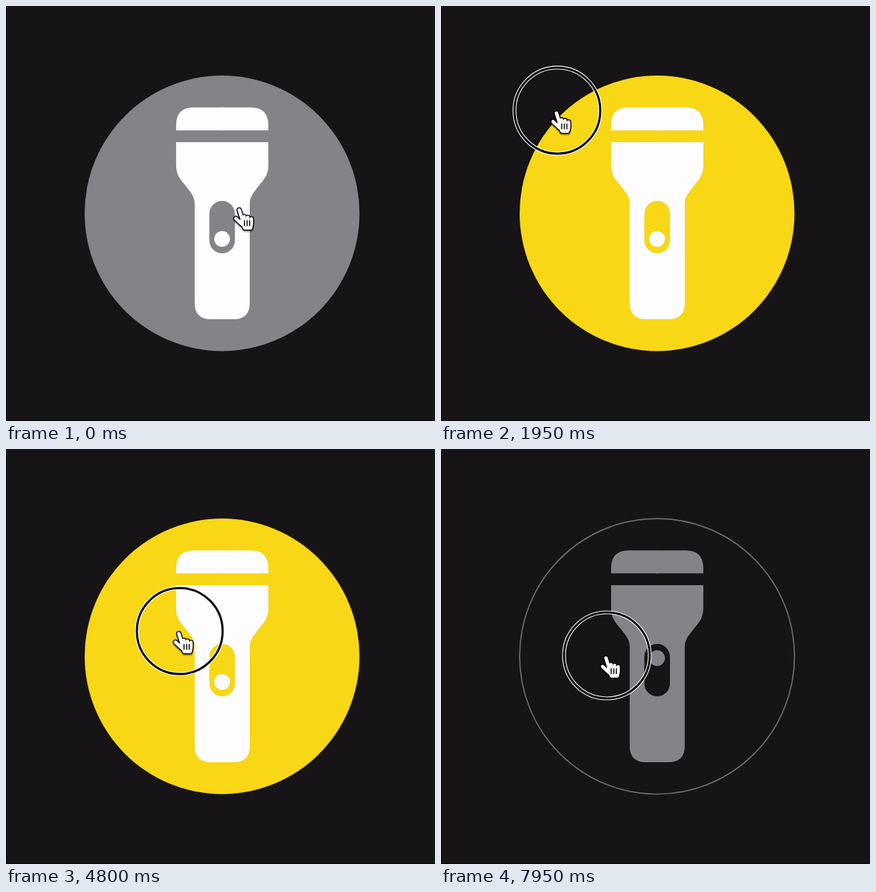
Recreate the animation shown at these times as an HTML page. Size 600 px wide and 579 px high, loop 8 s.

```html
<!DOCTYPE html>
<html lang="en">
<head>
<meta charset="utf-8">
<title>Flashlight button</title>
<style>
  html, body { margin: 0; width: 100%; height: 100%; overflow: hidden; background: #161417; }
  svg { display: block; width: 100vw; height: 100vh; }
</style>
</head>
<body>
<svg viewBox="0 0 600 579">
  <defs>
    <!-- left half of the torch; reaches past the axis so no seam shows -->
    <path id="half" d="M1 -148H-40Q-64.500 -148 -64.500 -123V-116H1ZM1 -99.500H-64.500V-68
      C-64.500 -54 -59 -48 -53 -41L-46 -32Q-38.500 -23 -38.500 -14V125Q-38.500 147.500 -16 147.500H1Z"/>
    <path id="hand" d="M-1.300 3.600L3 17M-6 15.500L3 24M5.700 13V24M10.700 14V24M2 19L6.500 28.700H14.500L15.700 23V16"/>
  </defs>
  <rect width="600" height="579" fill="#161417"/>
  <path d="M.5 0V579M0 578.500H600" stroke="#08070a"/>
  <circle id="disc" cx="302.200" cy="289.300" r="192.200" stroke-width="1.700" stroke-opacity=".8"/>
  <g id="torch" transform="translate(302.400 289.500)">
    <use href="#half"/>
    <use href="#half" transform="scale(-1 1)"/>
  </g>
  <rect id="slot" x="284.400" y="272" width="35.800" height="73" rx="17.900"/>
  <circle id="knob" cx="302.200" r="11"/>
  <g id="pointer" fill="none">
    <g id="ring">
      <circle r="60" stroke="#fff" stroke-width="5.200"/>
      <circle r="60" stroke="#050505" stroke-width="3"/>
    </g>
    <g stroke="#000" stroke-linecap="round" stroke-linejoin="round">
      <use href="#hand" y="2" stroke-width="8" opacity=".25"/>
      <use href="#hand" stroke-width="7.600"/>
      <use href="#hand" stroke="#fff" fill="#fff" stroke-width="4.800"/>
      <path d="M6 18.500V25.500M9.700 18.500V25.500M13.300 18.500V25.500" stroke-width="1.400"/>
    </g>
  </g>
</svg>
<script>
const LOOP = 8000, STEP = 50;
const GRAY = '#858288', YELLOW = '#f7d716', WHITE = '#fdfcff', DARK = '#161417';
const TOGGLE = 4850, SLIDE = 200;
const presses = [[400, 3580], [4700, TOGGLE], [6500, LOOP]];

const smooth = u => u * u * (3 - 2 * u);
const easeOut = u => Math.sin(u * Math.PI / 2);
const easeIn = u => u ** 3;

// The pointer rests between moves
const home = { x: 327.5, y: 281 };
const moves = [
  { from: 50, to: 700, x: 363, y: 348 },
  { from: 850, to: 1400, x: 45, y: 2 },
  { from: 1650, to: 2450, x: 257, y: 261, ease: easeOut },
  { from: 2900, to: 3450, x: 82, y: 19 },
  { from: 4020, to: 4650, x: 243, y: 254 },
  { from: 5720, to: 6100, x: 56, y: 272 },
  { from: 6220, to: 6550, x: 186, y: 274 },
  { from: 6880, to: 7350, x: 52, y: 278 },
  { from: 7400, to: 7950, x: 232, y: 288, ease: easeIn }
];

const clamp = u => Math.min(1, Math.max(0, u));

function pointerAt(t) {
  let { x, y } = home;
  for (const m of moves) {
    const k = (m.ease || smooth)(clamp((t - m.from) / (m.to - m.from)));
    x += (m.x - x) * k;
    y += (m.y - y) * k;
  }
  return { x, y };
}

function set(id, attrs) {
  const el = document.getElementById(id);
  for (const k in attrs) el.setAttribute(k, attrs[k]);
}

function draw(t) {
  const { x, y } = pointerAt(t);
  const down = presses.some(([a, b]) => t >= a && t < b);
  const inside = Math.max(Math.abs(x - 302), Math.abs(y - 289)) < 192;
  const on = t >= TOGGLE;
  const tint = on !== (down && inside) ? YELLOW : GRAY;
  const back = on ? DARK : tint, icon = on ? tint : WHITE;
  const slide = easeOut(clamp((t - TOGGLE) / SLIDE));

  set('disc', { fill: back, stroke: on ? tint : 'none' });
  set('torch', { fill: icon });
  set('slot', { fill: back });
  set('knob', { fill: icon, cy: 325 - 33.3 * slide });
  set('ring', { visibility: down ? 'visible' : 'hidden' });
  set('pointer', { transform: `translate(${x} ${y})` });
}

const start = performance.now();
function tick(now) {
  const t = Math.max(0, now - start) % LOOP;
  draw(Math.floor(t / STEP) * STEP);
  requestAnimationFrame(tick);
}
draw(0);
requestAnimationFrame(tick);
</script>
</body>
</html>
```
